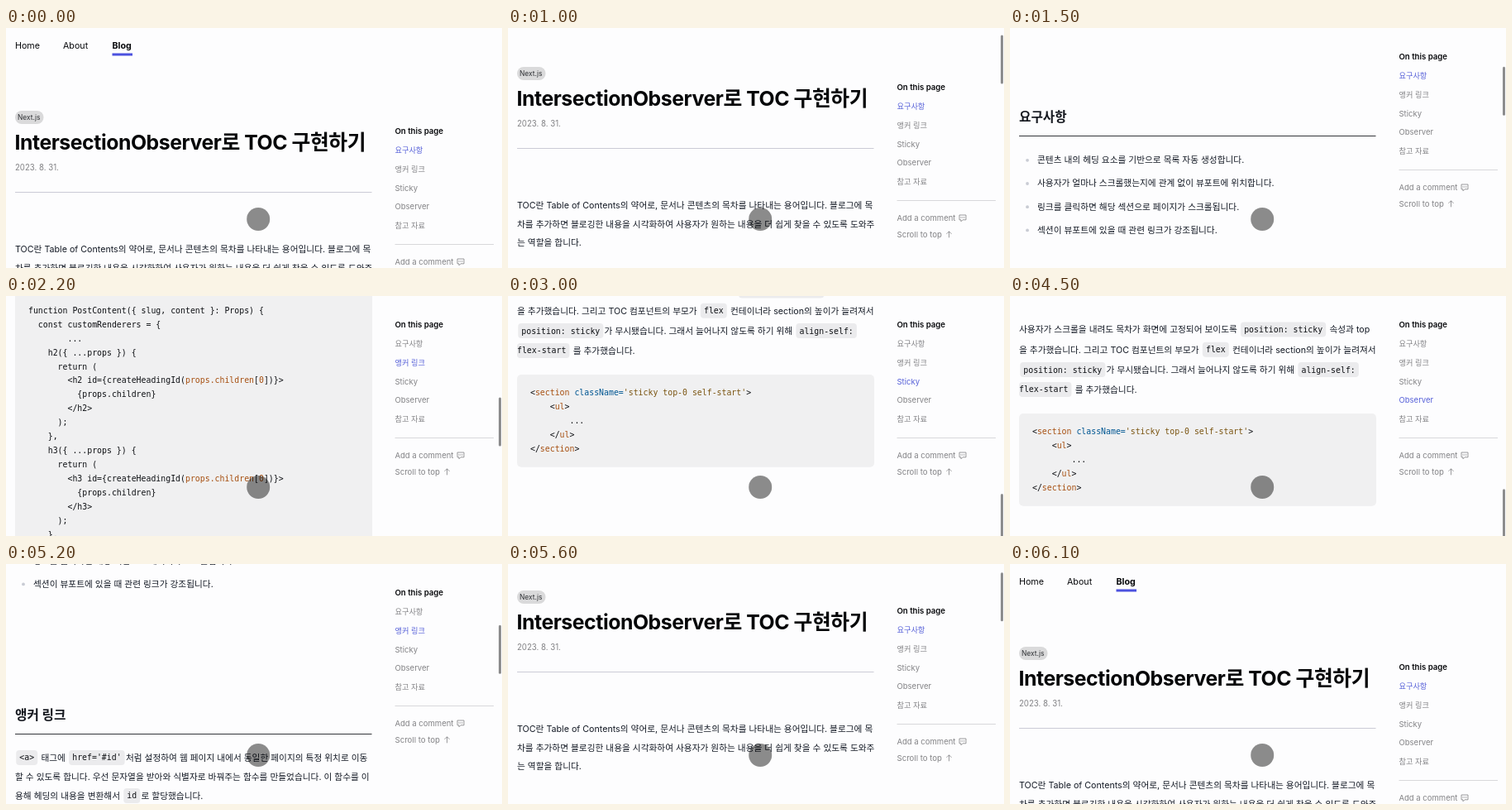
An HTML page with a canvas that plays this animation: 600x290 px, repeating every 6.2 s.

```html
<!DOCTYPE html>
<html lang="ko">
<head>
<meta charset="utf-8">
<title>TOC scroll</title>
<style>
  html, body { margin: 0; width: 100%; height: 100%; overflow: hidden; background: #fdfdfe; }
  canvas { display: block; width: 600px; height: 290px; }
</style>
</head>
<body>
<canvas id="stage"></canvas>
<script>
const W = 600, H = 290, LOOP = 6200, STEP = 100;
const LEFT = 11, RIGHT = 442.5, BODY = 10.7, MONO = 9.87, CODE_STEP = 16.95;
const SANS = "Inter, 'Noto Sans CJK KR', 'Noto Sans CJK', sans-serif";
const MONO_FONT = `${MONO}px 'DejaVu Sans Mono', 'Noto Sans CJK KR', monospace`;
const INK = '#141a25', GRAY = '#828285', BLUE = '#5660d8';
const SYNTAX = { o: '#a64f10', a: '#015692', s: '#7a5410' };

const canvas = document.getElementById('stage');
const ctx = canvas.getContext('2d');
const ratio = window.devicePixelRatio || 1;
canvas.width = W * ratio;
canvas.height = H * ratio;

// time (ms), scroll offset (px), speed (px/ms)
const SCROLL = [
  [750, 0, 0], [1500, 365, 0.75], [2200, 983, 1.1], [3000, 1932, 0.8],
  [3900, 2203, 0], [4150, 2203, 0], [5200, 585, -1.3], [5750, 0, 0]
];

function scrollAt(t) {
  const next = SCROLL.findIndex(key => key[0] > t);
  if (next <= 0) return 0;
  const [t0, p0, v0] = SCROLL[next - 1], [t1, p1, v1] = SCROLL[next];
  const d = t1 - t0, u = (t - t0) / d, u2 = u * u, u3 = u2 * u;
  return (2 * u3 - 3 * u2 + 1) * p0 + (u3 - 2 * u2 + u) * d * v0
    + (3 * u2 - 2 * u3) * p1 + (u3 - u2) * d * v1;
}

// y is the optical middle of the line; returns the end x
function text(str, x, y, size = BODY, color = INK, weight = 400, spacing = 0) {
  ctx.font = `${weight} ${size}px ${SANS}`;
  ctx.letterSpacing = `${spacing}px`;
  ctx.fillStyle = color;
  ctx.fillText(str, x, y + size * 0.36);
  const end = x + ctx.measureText(str).width;
  ctx.letterSpacing = '0px';
  return end;
}

function mono(str, x, y, color = '#0e1014') {
  ctx.font = MONO_FONT;
  ctx.fillStyle = color;
  ctx.fillText(str, x, y + MONO * 0.35);
  return x + ctx.measureText(str).width;
}

function box(x, y, w, h, r, color) {
  ctx.fillStyle = color;
  ctx.beginPath();
  ctx.roundRect(x, y, w, h, r);
  ctx.fill();
}

function rule(x0, x1, y, color) {
  ctx.fillStyle = color;
  ctx.fillRect(x0, Math.floor(y), x1 - x0, 1);
}

function dot(x, y, r, color) {
  ctx.fillStyle = color;
  ctx.beginPath();
  ctx.arc(x, y, r, 0, 7);
  ctx.fill();
}

function chip(str, x, y) {
  ctx.font = MONO_FONT;
  const start = Math.max(x + 1.2, LEFT);
  const end = x + ctx.measureText(str).width + 9.4;
  box(start, y - 9, end - start, 18, 4, '#ebebed');
  mono(str, x + 5.3, y);
  return end + 1.2;
}

// `code` becomes a chip, *text* becomes a link
function rich(line, x, y) {
  for (const part of line.split(/(`[^`]*`|\*[^*]*\*)/)) {
    const inner = part.slice(1, -1);
    if (part[0] === '`') x = chip(inner, x, y);
    else if (part[0] === '*') x = text(inner, x, y, BODY, '#6a72da', 600);
    else x = text(part, x, y);
  }
}

function paragraph(y, step, ...lines) {
  lines.forEach((line, i) => rich(line, LEFT, y + i * step));
}

function heading(title, y) {
  text(title, LEFT, y, 15.7, '#15181f', 700);
  rule(LEFT, RIGHT, y + 23, '#34363b');
}

// ~kTEXT~ colours TEXT with syntax colour k
function codeBlock(top, source) {
  const lines = source.split('\n');
  box(LEFT, top, 432, 44 + (lines.length - 1) * CODE_STEP, 5, '#f0f0f1');
  lines.forEach((line, i) => {
    let x = 27;
    line.split(/~([oas].*?)~/).forEach((part, j) => {
      x = j % 2
        ? mono(part.slice(1), x, top + 22 + i * CODE_STEP, SYNTAX[part[0]])
        : mono(part, x, top + 22 + i * CODE_STEP);
    });
  });
}

const renderer = tag => `    ${tag}({ ...props }) {
      return (
        <${tag} id={createHeadingId(~oprops.children~[~o0~])}>
          {props.children}
        </${tag}>
      );
    },`;

const RENDERERS = `function createHeadingId(text: string) {
  const id = text.trim().toLowerCase();
  return id.replaceAll(' ', '-');
}

function PostContent({ slug, content }: Props) {
  const customRenderers = {
        ...
${renderer('h2')}
${renderer('h3')}
        ...
  };
  return (
    <ReactMarkdown components={customRenderers}>
      {content}
    </ReactMarkdown>
  );
}`;

const LAYOUT = `<~omain~ ~aclassName=~~s'flex'~>
    <~oarticle~>
        ...
    </~oarticle~>
    <~osection~>
        <~oul~>
            ...
        </~oul~>
    </~osection~>`;

const STICKY = `<~osection~ ~aclassName=~~s'sticky top-0 self-start'~>
    <~oul~>
        ...
    </~oul~>
</~osection~>`;

const OBSERVER = `const observerOption = {
  threshold: 1,
};`;

const TOC = [['요구사항', 472], ['앵커 링크', 767], ['Sticky', 1573], ['Observer', 2284], ['참고 자료', 3100]];

const BULLETS = [
  '콘텐츠 내의 헤딩 요소를 기반으로 목록 자동 생성합니다.',
  '사용자가 얼마나 스크롤했는지에 관계 없이 뷰포트에 위치합니다.',
  '링크를 클릭하면 해당 섹션으로 페이지가 스크롤됩니다.',
  '섹션이 뷰포트에 있을 때 관련 링크가 강조됩니다.'
];

function drawIntro() {
  text('Home', LEFT, 21.5, BODY, '#08090c');
  text('About', 69, 21.5, BODY, '#08090c');
  text('Blog', 128.5, 21.5, BODY, '#08090c', 700);
  ctx.fillStyle = '#4c51df';
  ctx.fillRect(128.5, 30.5, 24.5, 3);

  box(LEFT, 100, 34.5, 16, 8, '#dadadb');
  text('Next.js', 14, 108.3, 8.4, '#2b2d31');
  text('IntersectionObserver로 TOC 구현하기', 10.5, 138.5, 24.8, '#050608', 700, -0.45);
  text('2023. 8. 31.', LEFT, 168.3, 9.65, GRAY);
  rule(LEFT, RIGHT, 198, '#cbcbd6');
  paragraph(267.3, 22.6,
    'TOC란 Table of Contents의 약어로, 문서나 콘텐츠의 목차를 나타내는 용어입니다. 블로그에 목',
    '차를 추가하면 블로깅한 내용을 시각화하여 사용자가 원하는 내용을 더 쉽게 찾을 수 있도록 도와주',
    '는 역할을 합니다.');
}

function drawSections() {
  TOC.slice(0, 4).forEach(([title, y]) => heading(title, y));

  BULLETS.forEach((line, i) => {
    const y = 524.3 + i * 28.2;
    dot(21, y + 0.5, 1.9, '#c9ccd4');
    text(line, 33, y);
  });

  paragraph(819, 23,
    "`<a>` 태그에 `href='#id'`처럼 설정하여 웹 페이지 내에서 동일한 페이지의 특정 위치로 이동",
    '할 수 있도록 합니다. 우선 문자열을 받아와 식별자로 바꿔주는 함수를 만들었습니다. 이 함수를 이',
    '용해 헤딩의 내용을 변환해서 `id`로 할당했습니다.');
  codeBlock(893.5, RENDERERS);

  paragraph(1625, 23,
    '목차는 본문 옆에 위치하며 스크롤을 내려도 계속 보여야 합니다.',
    '먼저 본문과 목차를 나란히 배치했습니다.');
  codeBlock(1676, LAYOUT);
  paragraph(1925.5, 24.3,
    '사용자가 스크롤을 내려도 목차가 화면에 고정되어 보이도록 `position: sticky` 속성과 top',
    '을 추가했습니다. 그리고 TOC 컴포넌트의 부모가 `flex` 컨테이너라 section의 높이가 늘려져서',
    '`position: sticky`가 무시됐습니다. 그래서 늘어나지 않도록 하기 위해 `align-self:`');
  rich('`flex-start` 를 추가했습니다.', LEFT - 5.3, 1998);
  codeBlock(2027, STICKY);

  paragraph(2336, 22.8,
    '*IntersectionObserver*를 생성합니다. 관찰 대상 요소가 뷰포트 내에 진입했을 때 해당 요소의 id',
    '로 `currentId`를 바꿔줍니다. `IntersectionObserver`는 브라우저 API이므로 컴포넌트가',
    '마운트된 후에 사용해야 합니다. 그래서 useEffect에 코드를 작성했습니다.');
  paragraph(2418.5, 22.6,
    'observerOption에서 threshold와 rootMargin을 설정하여 교차 여부를 판단하는 기준 비율과',
    '교차 영역을 설정합니다.');
  codeBlock(2469, OBSERVER);
}

// Going down, the last heading that came into view wins; going up, the first one below the top.
function activeIndex(t, scroll) {
  if (t > 4100) return TOC.findIndex(item => item[1] > scroll);
  return Math.max(0, TOC.filter(item => item[1] < scroll + 240).length - 1);
}

function drawToc(t, scroll) {
  const top = Math.max(34, 124 - scroll), x = 470.5;
  const active = activeIndex(t, scroll);
  text('On this page', x, top + 0.5, 9.6, '#08090c', 600);
  TOC.forEach(([title], i) => {
    const size = /[가-힣]/.test(title) ? 9.2 : 9.5;
    text(title, x, top + 23.5 + i * 22.8, size, i === active ? BLUE : GRAY);
  });
  rule(x, 590, top + 137, '#d8d8db');
  text('Add a comment', x, top + 159, 9.5, GRAY);
  text('Scroll to top', x, top + 178.7, 9.6, GRAY);

  ctx.strokeStyle = GRAY;
  ctx.lineWidth = 0.8;
  ctx.beginPath();
  const y = top + 155;
  ctx.moveTo(546, y);
  ctx.lineTo(554, y);
  ctx.lineTo(554, y + 5.8);
  ctx.lineTo(550, y + 5.8);
  ctx.lineTo(548, y + 7.8);
  ctx.lineTo(548, y + 5.8);
  ctx.lineTo(546, y + 5.8);
  ctx.closePath();
  const tip = top + 174.8;
  ctx.moveTo(533.5, tip + 7.5);
  ctx.lineTo(533.5, tip);
  ctx.moveTo(530.5, tip + 3);
  ctx.lineTo(533.5, tip);
  ctx.lineTo(536.5, tip + 3);
  ctx.stroke();
  for (let i = -1; i < 2; i++) dot(550 + i * 2, y + 2.9, 0.6, GRAY);
}

function drawScrollbar(t, scroll) {
  const fade = Math.min((t - 750) / 100, (6050 - t) / 200, 1);
  if (fade <= 0) return;
  ctx.globalAlpha = fade;
  box(596, 2 + scroll * 0.1227, 3, 59, 1.5, '#8c8c8d');
  ctx.globalAlpha = 1;
}

function draw(now) {
  const t = Math.floor(now % LOOP / STEP) * STEP;
  const scroll = Math.round(scrollAt(t));
  ctx.setTransform(ratio, 0, 0, ratio, 0, 0);
  ctx.fillStyle = '#fdfdfe';
  ctx.fillRect(0, 0, W, H);

  ctx.save();
  ctx.translate(0, -scroll);
  drawIntro();
  drawSections();
  ctx.restore();

  drawToc(t, scroll);
  drawScrollbar(t, scroll);
  dot(305.2, 231, 14, 'rgba(0, 0, 0, 0.45)');
}

const start = performance.now();
function tick() {
  draw(performance.now() - start);
  requestAnimationFrame(tick);
}
tick();
</script>
</body>
</html>
```
